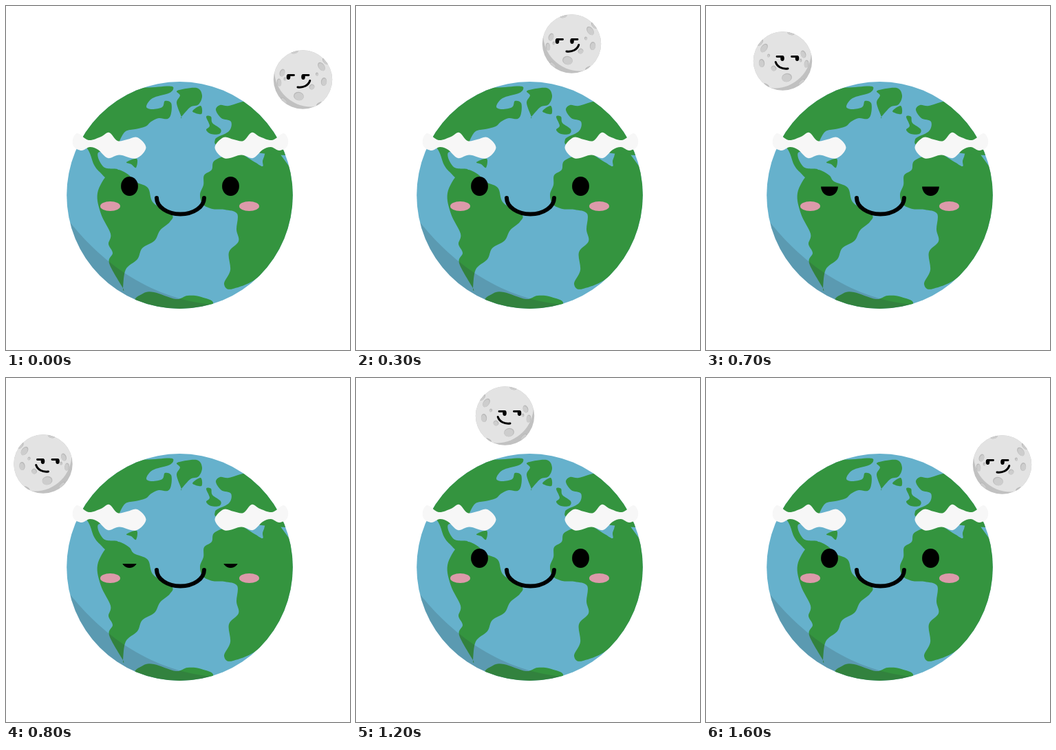
An HTML page with a canvas for the animation above (1.8 s loop, 500x500 px).

```html
<!DOCTYPE html>
<html lang="en">
<head>
<meta charset="utf-8">
<title>Earth and Moon</title>
<style>
html, body { margin: 0; width: 100%; height: 100%; overflow: hidden; background: #fff; }
canvas { display: block; width: 500px; height: 500px; }
</style>
</head>
<body>
<canvas id="stage"></canvas>
<script>
const canvas = document.getElementById('stage');
const ctx = canvas.getContext('2d');
const ratio = window.devicePixelRatio || 1;
canvas.width = canvas.height = 500 * ratio;

const LOOP = 1800, STEP = 100, MOON_R = 42.7;

// Closed smooth curve through x, y pairs; a doubled point makes a corner.
function blob(...p) {
  const n = p.length / 2;
  const at = i => { const k = (i + n) % n * 2; return [p[k], p[k + 1]]; };
  const path = new Path2D();
  path.moveTo(p[0], p[1]);
  for (let i = 0; i < n; i++) {
    const [a, b, c, d] = [-1, 0, 1, 2].map(j => at(i + j));
    path.bezierCurveTo(
      b[0] + (c[0] - a[0]) / 6, b[1] + (c[1] - a[1]) / 6,
      c[0] - (d[0] - b[0]) / 6, c[1] - (d[1] - b[1]) / 6, c[0], c[1]);
  }
  return path;
}

const lands = {
  northAmerica: blob(90, 190, 150, 115, 200, 118.5, 238, 116.5, 243, 121,
    236, 127, 213, 134, 204, 146, 212, 150, 227, 147, 231, 138, 240, 141,
    240, 156, 235, 164, 222, 163, 211, 168, 203, 175, 188, 179, 174, 182,
    166, 194, 160, 210, 134, 213, 142, 234, 163, 238, 150, 252, 137, 242,
    128, 231, 117, 206),
  southAmerica: blob(148, 244, 163, 238, 179, 246, 186, 255, 206, 264,
    214, 286, 241, 303, 238, 314, 224, 326, 216, 341, 198, 352, 191, 368,
    174, 383, 170, 410, 170, 410, 150, 374, 155, 359, 149, 346, 152, 331,
    138, 302, 133, 272),
  africa: blob(304, 224, 336, 214, 360, 226, 373, 233, 374, 222, 390, 205,
    440, 300, 376, 386, 330, 411, 317, 404, 326, 384, 324, 358, 338, 342,
    335, 325, 336, 302, 318, 296, 300, 295, 286, 288, 282, 274, 287, 260,
    288, 246, 299, 238),
  europe: blob(305, 151, 311, 144, 324, 145, 348, 138, 390, 130, 430, 212,
    320, 206, 304, 194, 324, 182, 327, 168, 313, 163),
  greenland: blob(249, 123, 277, 119, 285, 130, 280, 143, 268, 147,
    255, 161, 255, 161, 248, 141, 253, 130),
  iceland: blob(271, 153, 283, 145, 284, 157),
  britain: blob(291, 161, 298, 161, 300, 170, 312, 179, 310, 186, 298, 186,
    291, 180, 296, 174),
  cuba: blob(175, 227, 190, 222, 189, 235, 182, 230),
  antarctica: blob(190, 432, 199, 418, 215, 416, 247, 426, 264, 421,
    284, 423, 300, 434, 250, 460)
};

const cloud = blob(97, 194, 104, 185, 120, 195, 138, 190, 150, 184,
  162, 196, 176, 194, 191, 191, 203.5, 206, 189, 221.5, 165, 216.5,
  148, 221, 134, 209, 122, 205, 110, 210, 99, 205);

// Crater centre and radius; the tilt and squash follow from the sphere.
const craters = [
  [-6, 24, 7.5], [27, -19, 7], [30.5, 3, 6], [-30, -10, 5.6], [-34.5, 4, 5.6],
  [13, 10.5, 4], [20.5, -8, 2.5], [-12, -41, 5.5], [33, -27, 6],
  [24, 36, 5], [-28, 30, 5.5], [-26, -1, 2.5]];

// Step, x and y where the moon's swing changes speed.
const swing = [
  [0, 431.5, 107], [3, 313.5, 55], [6, 184, 55], [7, 111.5, 80], [8, 54, 125],
  [10, 130.5, 79], [12, 216.5, 55], [14, 325.5, 64], [16, 430.5, 126]];

function ellipse(x, y, rx, ry, color, tilt = 0) {
  ctx.beginPath();
  ctx.ellipse(x, y, rx, ry, tilt, 0, 7);
  ctx.fillStyle = color;
  ctx.fill();
}

function stroke(path, width) {
  ctx.lineWidth = width;
  ctx.lineCap = 'round';
  ctx.strokeStyle = '#000';
  ctx.stroke(new Path2D(path));
}

function clipped(shape, draw) {
  ctx.save();
  ctx.beginPath();
  shape();
  ctx.clip();
  draw();
  ctx.restore();
}

function drawGlobe() {
  ellipse(252.5, 275, 164.3, 165, '#66b1cc');
  clipped(() => ctx.ellipse(252.5, 275, 164.3, 165, 0, 0, 7), () => {
    ctx.fillStyle = '#34943f';
    for (const land of Object.values(lands)) ctx.fill(land);
    ctx.fillStyle = 'rgba(40,50,55,.18)';
    ctx.fill(new Path2D('M92 313C135 368 205 425 300 434V450H80V313Z'));
  });
}

function drawClouds() {
  ctx.fillStyle = '#f7f7f7';
  ctx.fill(cloud);
  ctx.save();
  ctx.translate(507, 0);
  ctx.scale(-1, 1);
  ctx.fill(cloud);
  ctx.restore();
}

function drawFace(lid) {
  clipped(() => ctx.rect(0, lid, 500, 100), () => {
    for (const x of [179.5, 326.5]) ellipse(x, 262, 12.4, 14, '#000');
  });
  for (const x of [151.5, 353.5]) ellipse(x, 291, 14.5, 7, '#dd9aaa');
  stroke('M219 279A34.5 23.5 0 0 0 288 279', 6);
}

function drawCrater([x, y, r]) {
  const depth = Math.hypot(x, y) / MOON_R;
  const thin = r * Math.sqrt(Math.max(.3, 1 - depth * depth));
  const tilt = Math.atan2(y, x);
  ellipse(x, y, thin, r, '#b9b9b9', tilt);
  ellipse(x + .4, y + .7, thin - .6, r - .7, '#cdcdcd', tilt);
}

function drawMoon([x, y]) {
  ctx.save();
  ctx.translate(x, y);
  if (x < 250) ctx.scale(-1, 1);
  clipped(() => ctx.arc(0, 0, MOON_R, 0, 7), () => {
    ctx.fillStyle = '#c1c1c1';
    ctx.fillRect(-50, -50, 100, 100);
    ellipse(12, -14, 53.5, 53.5, '#e3e3e3');
    craters.forEach(drawCrater);
  });
  for (const ex of [-21, 0.5]) {
    clipped(() => ctx.rect(ex - 5, -7, 10, 12), () => ellipse(ex, -4, 2.8, 4, '#000'));
    stroke(`M${ex - .5} -6.5h8.5`, 2.8);
  }
  stroke('M-7.5 11C1 12 8 8.5 10.3 1.5', 3);
  ctx.restore();
}

// Straight run between two swing points, lifted into an arc.
function moonAt(step) {
  const i = swing.findIndex(p => p[0] >= step);
  if (i < 1) return swing.at(i).slice(1);
  const [t0, x0, y0] = swing[i - 1], [t1, x1, y1] = swing[i];
  const u = (step - t0) / (t1 - t0);
  const lift = 6 * (step - t0) * (t1 - step);
  return [x0 + (x1 - x0) * u, y0 + (y1 - y0) * u - lift];
}

// Upper edge of the visible eye.
function lidAt(step) {
  if (step === 8) return 270;
  return step >= 6 && step <= 11 ? 262.5 : 240;
}

function frame(now) {
  let step = Math.floor(now % LOOP / STEP);
  if (step === 9) step = 8; // pause at the far end
  ctx.setTransform(ratio, 0, 0, ratio, 0, 0);
  ctx.fillStyle = '#fff';
  ctx.fillRect(0, 0, 500, 500);
  drawGlobe();
  drawClouds();
  drawFace(lidAt(step));
  drawMoon(moonAt(step));
  requestAnimationFrame(frame);
}
frame(0);
</script>
</body>
</html>
```
